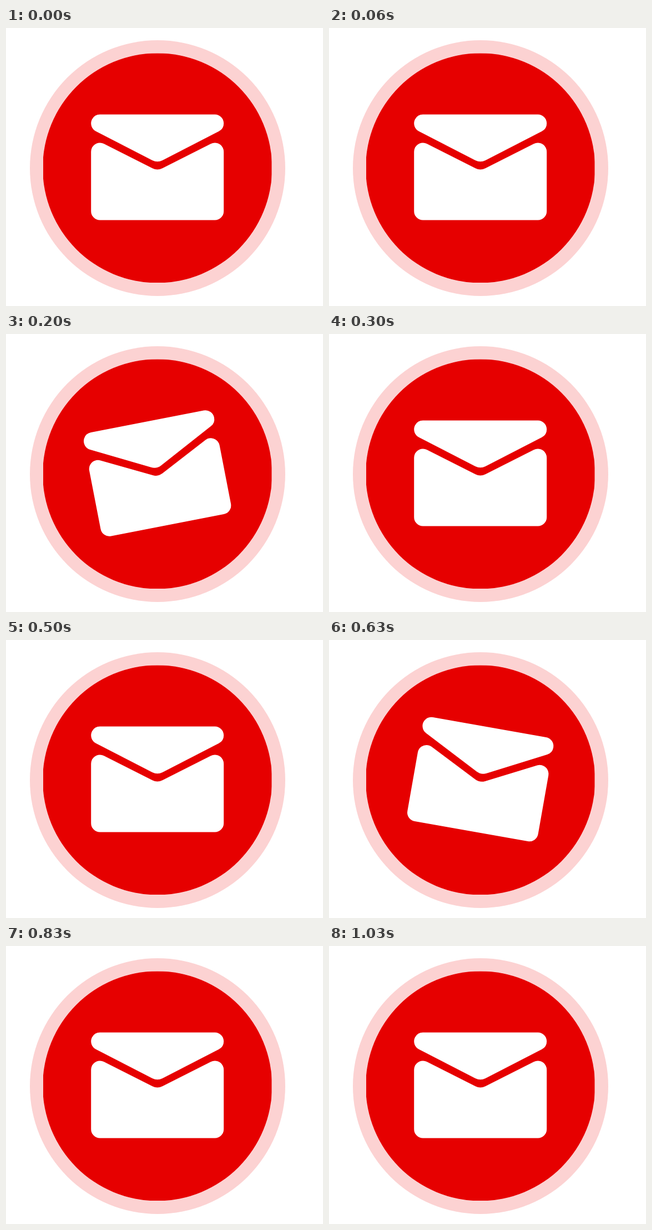
Write an HTML page with a canvas that moves like this. It is 571x500 px and loops after 1.16 s.

```html
<!DOCTYPE html>
<html lang="en">
<head>
<meta charset="utf-8">
<title>Shaking envelope</title>
<style>
  html, body { margin: 0; width: 100%; height: 100%; overflow: hidden; background: #fff; }
  canvas { display: block; }
</style>
</head>
<body>
<canvas id="stage" width="571" height="500"></canvas>
<script>
const ctx = document.getElementById('stage').getContext('2d');
const LOOP = 1160, HALF = 530, STEP = 100;
const CX = 272.7, CY = 250.5;   // envelope centre and pivot
const R = 16, DX = 103.5;       // corner radius, corner centres from the middle
const rad = deg => deg * Math.PI / 180;
const SLANT = rad(27);

// The envelope tilts right, then left, then rests; this happens twice per loop.
function tiltAt(t) {
  const step = Math.floor((t % HALF) / STEP);
  if (t >= 2 * HALF) return 0;
  return step === 1 ? 10 : step === 2 ? -11 : 0;
}

function disc(x, y, r, color) {
  ctx.fillStyle = color;
  ctx.beginPath();
  ctx.arc(x, y, r, 0, Math.PI * 2);
  ctx.fill();
}

function badge() {
  ctx.fillStyle = '#fff';
  ctx.fillRect(0, 0, 571, 500);
  disc(273, 252, 230, '#fcd2d2');
  // the red disc is cut slightly flat at its edges
  ctx.save();
  ctx.beginPath();
  ctx.rect(67, 45.4, 411.5, 412.5);
  ctx.clip();
  disc(272.7, 251.8, 206.6, '#e60000');
  ctx.restore();
}

function flap() {
  const y = -79;
  ctx.beginPath();
  ctx.arc(-DX, y, R, Math.PI / 2 + SLANT, Math.PI * 1.5);
  ctx.arc(DX, y, R, -Math.PI / 2, Math.PI / 2 - SLANT);
  ctx.arcTo(0, -7.8, -DX, y + 17, 20);
  ctx.closePath();
  ctx.fill();
}

function pocket() {
  const top = -28, bottom = 79;
  ctx.beginPath();
  ctx.arc(-DX, top, R, Math.PI, Math.PI * 1.5 + SLANT);
  ctx.arcTo(0, 6.4, DX - 7, top - 14.3, 20);
  ctx.arc(DX, top, R, -Math.PI / 2 - SLANT, 0);
  ctx.arc(DX, bottom, R, 0, Math.PI / 2);
  ctx.arc(-DX, bottom, R, Math.PI / 2, Math.PI);
  ctx.closePath();
  ctx.fill();
}

function draw(t) {
  badge();
  ctx.save();
  ctx.translate(CX, CY);
  ctx.rotate(rad(tiltAt(t)));
  ctx.fillStyle = '#fff';
  flap();
  pocket();
  ctx.restore();
}

let start = null;
function tick(now) {
  if (start === null) start = now;
  draw((now - start) % LOOP);
  requestAnimationFrame(tick);
}
draw(0);
requestAnimationFrame(tick);
</script>
</body>
</html>
```
